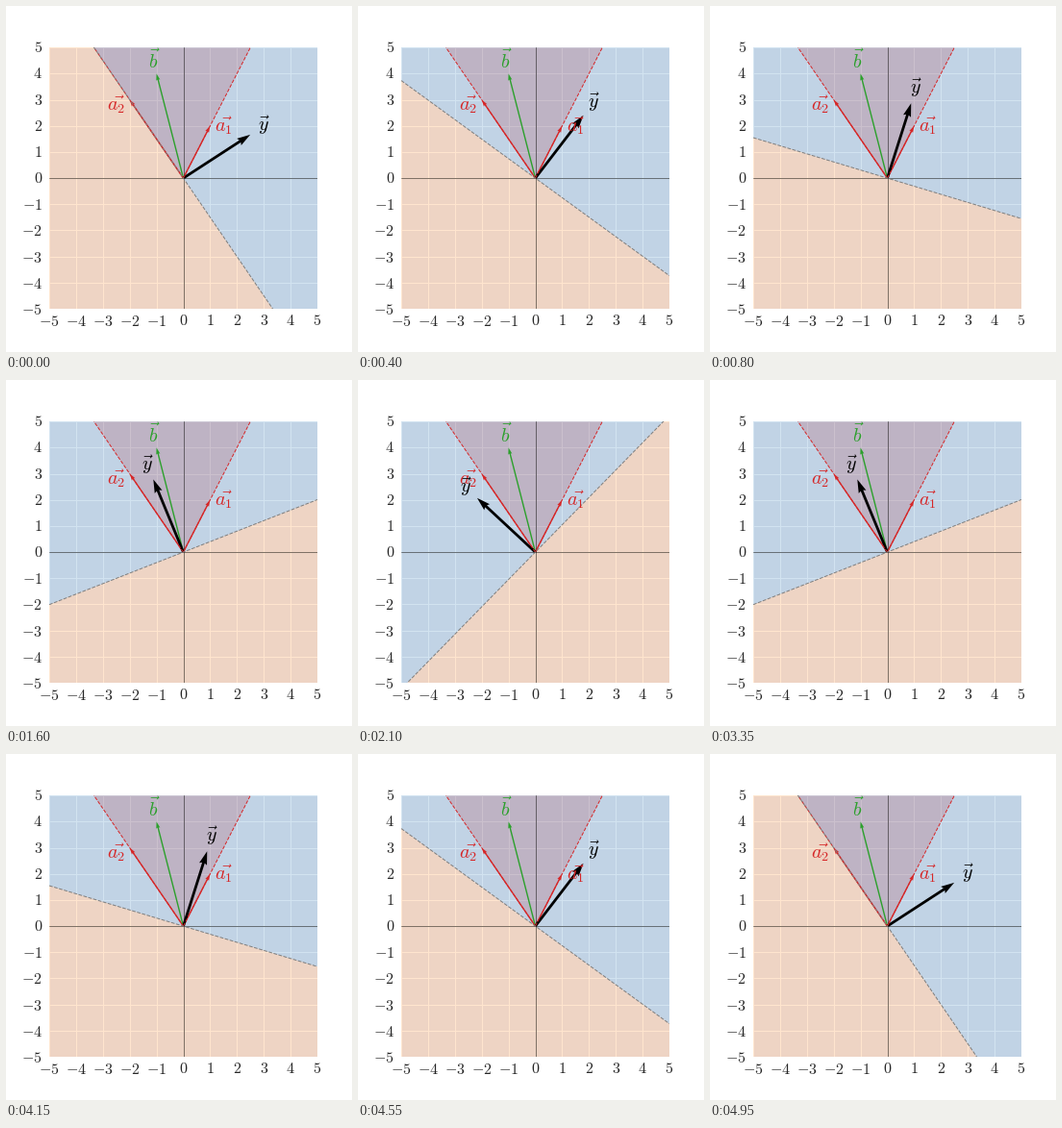
Recreate the animation shown at these times as a matplotlib script. Size 360x360 px, loop 5 s.

```python
import numpy as np
import matplotlib.pyplot as plt
from matplotlib.animation import FuncAnimation

plt.rcParams["mathtext.fontset"] = "cm"

SIZE, DPI = 360, 72
STEPS = 50
LIM = 5
BLUE, ORANGE, GREEN, RED, GRAY = "#1f77b4", "#ff7f0e", "#2ca02c", "#d62728", "#7f7f7f"
INK = "#262626"

A1, A2, B = np.array([1, 2]), np.array([-2, 3]), np.array([-1, 4])
START = np.arctan2(2, 3)       # y perpendicular to a2
END = np.arctan2(1, -2)        # y perpendicular to a1
Y_LENGTH, LABEL_RADIUS = 3, np.sqrt(13)

fig = plt.figure(figsize=(SIZE / DPI, SIZE / DPI), dpi=DPI, facecolor="white")
ax = fig.add_axes([0.125, 0.125, 0.775, 0.755], facecolor="#eaeaf2")
ax.set(xlim=(-LIM, LIM), ylim=(-LIM, LIM))
ax.set_axisbelow(True)
ax.spines[:].set_visible(False)

ticks = range(-LIM, LIM + 1)
ax.set_xticks(ticks, [])
ax.set_yticks(ticks, [])
ax.tick_params(length=0)
ax.grid(color="white", lw=1)


def tick_label(value, offset, at, **align):
    ax.annotate(f"${value}$", at, offset, textcoords="offset points",
                fontsize=16, color=INK, annotation_clip=False, **align)


for v in ticks:
    drop = 1 if v < 0 else 0
    tick_label(v, (0, -17 - drop), (v, -LIM), ha="center", va="baseline")
    tick_label(v, (-7, -5 - drop), (-LIM, v), ha="right", va="baseline")


def arrow(vec, color, width):
    return ax.quiver(0, 0, *vec, color=color, width=width, angles="xy",
                     scale_units="xy", scale=1, zorder=1.5)


def label(text, x, y, color):
    return ax.text(x, y, rf"$\vec{{{text}}}$", color=color, fontsize=20,
                   ha="center", va="center")


ax.axhline(0, color="black", lw=0.5)
ax.axvline(0, color="black", lw=0.5)

# Cone spanned by a1 and a2
rays = [A1 * LIM / A1[1], A2 * LIM / A2[1]]
ax.fill(*zip((0, 0), *rays), color=RED, alpha=0.2, lw=0, zorder=1)
for ray in rays:
    ax.plot([0, ray[0]], [0, ray[1]], "--", color=RED, lw=1)

for vec, color in ((A1, RED), (A2, RED), (B, GREEN)):
    arrow(vec, color, 0.005)
label("a_1", 1.5, 2, RED)
label("a_2", -2.5, 2.8, RED)
label("b", -1.1, 4.5, GREEN)

# Half planes split by the line perpendicular to y
halves = [ax.fill([0], [0], color=c, alpha=0.2, lw=0, zorder=1)[0]
          for c in (BLUE, ORANGE)]
border, = ax.plot([], [], "--", color=GRAY, lw=1)
y_arrow = arrow((1, 1), "black", 0.01)
y_label = label("y", 0, 0, "black")


def update(frame):
    step = min(frame, 2 * STEPS - 1 - frame)
    angle = START + (END - START) * step / (STEPS - 1)
    y = np.array([np.cos(angle), np.sin(angle)])
    along = np.array([y[1], -y[0]])
    far = 4 * LIM

    for half, side in zip(halves, (1, -1)):
        out = side * far * y
        half.set_xy([-far * along, far * along, far * along + out, -far * along + out])

    reach = LIM / along[0]
    border.set_data(*zip(-reach * along, reach * along))
    y_arrow.set_UVC(*(Y_LENGTH * y))
    y_label.set_position(LABEL_RADIUS * y)
    return *halves, border, y_arrow, y_label


anim = FuncAnimation(fig, update, frames=2 * STEPS, interval=50,
                     repeat=True, repeat_delay=0)
plt.show()
```
